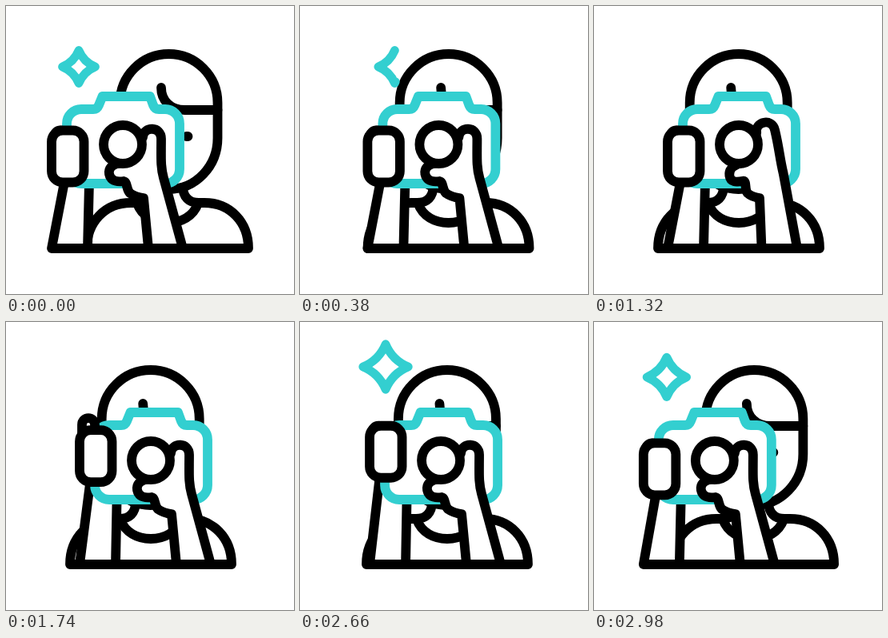
An HTML page that plays this animation: 360 by 360 pixels, repeating every 3 s.

```html
<!DOCTYPE html>
<html lang="en">
<head>
<meta charset="utf-8">
<title>Photographer</title>
<style>
  html, body { margin: 0; width: 100%; height: 100%; overflow: hidden; background: #fff; }
  svg { display: block; width: 100vw; height: 100vh; }
</style>
</head>
<body>
<svg viewBox="0 0 360 360" fill="#fff" stroke="#000" stroke-width="11.8" stroke-linecap="round" stroke-linejoin="round">
  <g id="body">
    <path d="M-101 303C-101 270 -78 246 -46 246H-39C-27 246 -19 239 -19 225H19C19 239 27 246 39 246H46C78 246 101 270 101 303Z"/>
    <path fill="none" d="M-38 247C-32 263 -17 271 0 271S32 263 38 247"/>
  </g>
  <g id="head">
    <path d="M-61 121A61 61 0 0 1 61 121V165A61 64 0 0 1 -61 165Z"/>
    <path fill="none" d="M-9.5 102C-9.5 118 2 130 20 130H61M22 163H24"/>
  </g>
  <g id="rig">
    <path id="sparkle" fill="none" stroke="#33cfd0" pathLength="1" d="M0 -20.5Q-6 -6 -20.5 0Q-6 6 0 20.5Q6 6 20.5 0Q6 -6 0 -20.5Z"/>
    <path id="arm"/>
    <path stroke="#33cfd0" d="M94 129H109Q114 129 116 124L120.500 113H180L184 124Q186 129 191 129H199A18 18 0 0 1 217 147V204A18 18 0 0 1 199 222H94A18 18 0 0 1 76 204V147A18 18 0 0 1 94 129Z"/>
    <path id="hand"/>
    <circle cx="146" cy="173" r="24"/>
    <g id="grip">
      <path id="finger" d="M60 180V163.500A8 8 0 0 1 76 163.500V180"/>
      <rect x="57" y="155.500" width="40.500" height="65" rx="14"/>
    </g>
  </g>
</svg>
<script>
const LOOP = 3000;
const LENS = { x: 146, y: 173 };
const MAX_TWIST = 27 * Math.PI / 180;
const THUMB = 'M146,196C131,197 128,204 129,210C131,219 138,220 147,219C152,220 150,229 155,234Q162,239 172,240';
const FINGER = 'L197,215C193,200 194,190 194,166C194,150 172,150 171,164Z';
const el = Object.fromEntries([...document.querySelectorAll('[id]')].map(e => [e.id, e]));

const clamp = x => Math.min(1, Math.max(0, x));
const ease = (t, from, to) => {
  const x = clamp((t - from) / (to - from));
  return x * x * (3 - 2 * x);
};
const move = (node, x, y = 0, s = 1) => node.setAttribute('transform', `translate(${x} ${y}) scale(${s})`);

// Turns the points of a path around the lens, fading out towards the wrist.
function turn(path, twist) {
  return path.replace(/(\d+),(\d+)/g, (_, px, py) => {
    const angle = MAX_TWIST * twist * clamp((240 - py) / 50);
    const c = Math.cos(angle), s = Math.sin(angle);
    const dx = px - LENS.x, dy = py - LENS.y;
    return `${LENS.x + dx * c + dy * s},${LENS.y + dy * c - dx * s}`;
  });
}

function drawSparkle(t) {
  const popping = t > 1500;
  const pop = ease(t, 2180, 2650);
  const settle = ease(t, 2700, 3170);
  const length = popping ? 1 : 1 - ease(t, 0, 780);
  const scale = popping ? 1.38 * pop - 0.27 * settle : 1;
  el.sparkle.style.display = length > 0 && scale > 0.01 ? '' : 'none';
  el.sparkle.setAttribute('stroke-dasharray', length < 1 ? `${length} 2` : 'none');
  el.sparkle.setAttribute('stroke-width', 10.8 / Math.max(scale, 1));
  // Grows out of the top of the camera, then drifts back to rest.
  if (popping) move(el.sparkle, 125 - 48 * pop + 14 * settle, 124 - 68 * pop + 20 * settle, scale);
  else move(el.sparkle, 91, 76);
}

function draw(t) {
  const back = ease(t, 2518, 3122);
  const aim = ease(t, 0, 545) - back;
  const twist = ease(t, 400, 740) - ease(t, 1080, 1560);
  const lift = ease(t, 1400, 1950) - back;
  const press = ease(t, 1480, 1740) - ease(t, 2050, 2170);
  const wrist = 220 - 30 * lift;

  move(el.body, 202 - 21 * aim);
  move(el.head, 203.5 - 22.8 * aim);
  move(el.rig, 35 * aim);
  move(el.grip, 0, -30 * lift);
  move(el.finger, 0, -15 * press);
  el.arm.setAttribute('d', `M${73 - 4 * lift} ${wrist}L57 303H102L104 ${wrist}Z`);
  const forearm = `L${178 - 7 * twist} 303H${221 - 4 * twist}`;
  el.hand.setAttribute('d', turn(THUMB, twist) + forearm + turn(FINGER, twist));
  drawSparkle(t);
}

const start = performance.now();
function tick() {
  draw((performance.now() - start) % LOOP);
  requestAnimationFrame(tick);
}
tick();
</script>
</body>
</html>
```
